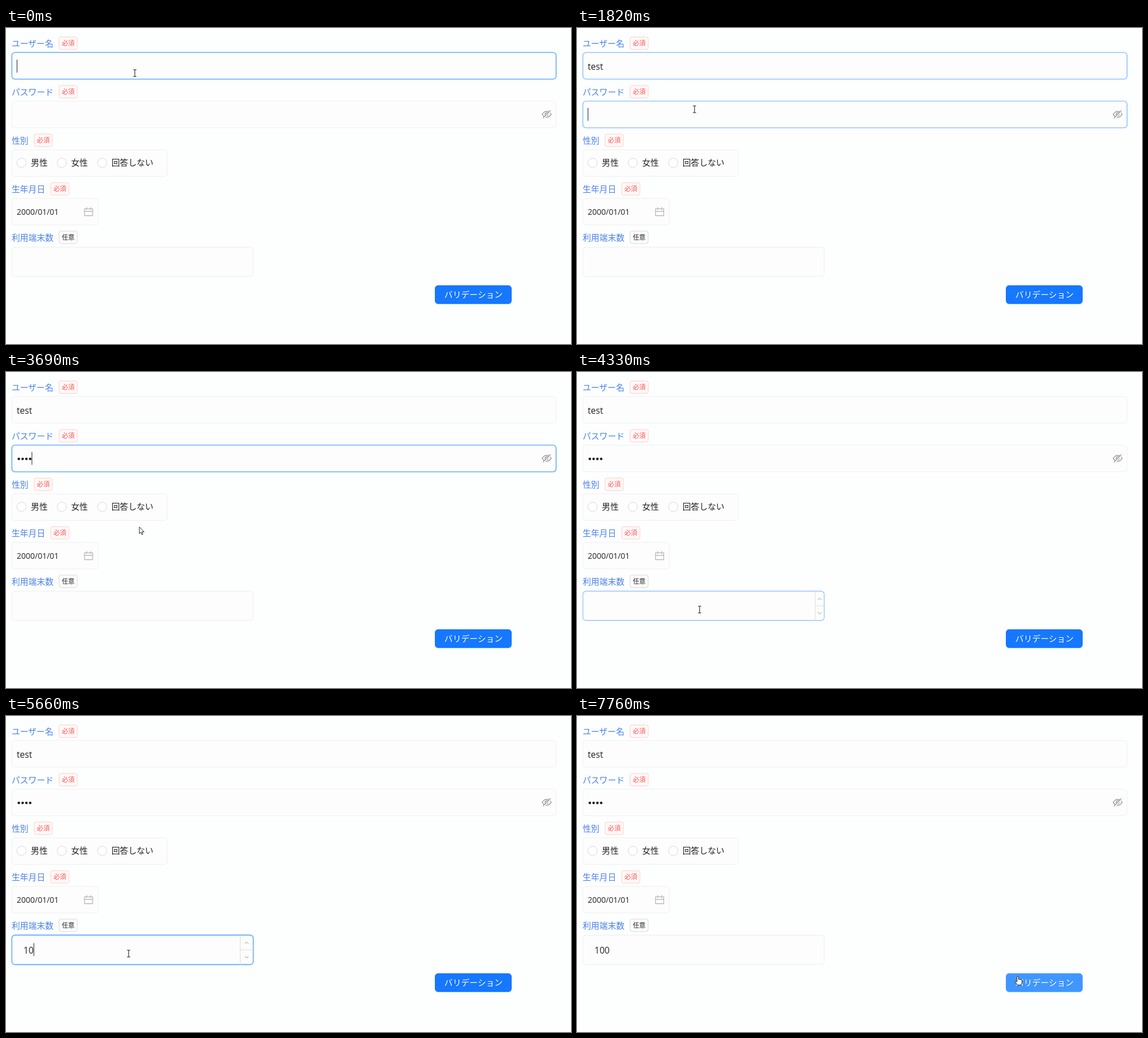
Recreate the animation shown at these times as an HTML page. Size 1000x560 px, loop 8000 ms.

```html
<!DOCTYPE html>
<html lang="ja">
<head>
<meta charset="utf-8">
<style>
  html, body { margin: 0; width: 100%; height: 100%; overflow: hidden; background: #fdfefe; }
  svg { display: block; width: 100vw; height: 100vh; }
  text { font: 300 14.8px "Noto Sans CJK JP", "Noto Sans CJK", sans-serif; fill: #222; }
  .latin { font: 400 15.6px "Open Sans", "Noto Sans", sans-serif; }
  .label { fill: #4a80e8; }
  .tag { font-size: 11.3px; font-weight: 400; }
  .line { fill: none; stroke-linecap: round; stroke-linejoin: round; }
</style>
</head>
<body>
<svg id="stage" viewBox="0 0 1000 560"></svg>
<script>
const stage = document.getElementById('stage');
const IDLE = 0, HOVER = 1, HALF = 2, FOCUS = 3;
const BORDER = ['#f0f0f2', '#86bafc', '#75b3ff', '#4096ff'];
const GLOW = [0, 0, 0.05, 0.1];

// Each track is a list of [start time in ms, value].
const tracks = {
  userState: [[0, FOCUS], [1820, HALF], [1950, IDLE]],
  userLength: [[0, 0], [300, 1], [450, 2], [720, 3], [870, 4]],
  userCaret: [[0, 1], [150, 0], [300, 1], [1700, 0]],
  passState: [[0, IDLE], [1400, HOVER], [1820, HALF], [1950, FOCUS], [3800, HALF], [3940, IDLE]],
  passLength: [[0, 0], [2520, 1], [2670, 2], [2950, 3], [3260, 4]],
  passCaret: [[0, 0], [1820, 1], [2370, 0], [2520, 1], [3800, 0]],
  countState: [[0, IDLE], [4330, HOVER], [4630, HALF], [4780, FOCUS], [7340, HALF], [7480, IDLE]],
  countLength: [[0, 0], [5360, 1], [5660, 2], [5810, 3]],
  countCaret: [[0, 0], [4630, 1], [5210, 0], [5360, 1], [6250, 0], [6650, 1], [7070, 0]],
  handleWidth: [[0, 0], [4330, 17], [4480, 24], [7070, 0]],
  buttonColor: [[0, '#1677ff'], [7760, '#4096ff']],
  pointer: [
    [0, ['beam', 228, 80]], [1100, ['arrow', 222, 96]], [1250, ['arrow', 212, 122]],
    [1400, ['arrow', 207.5, 137.5]], [1550, ['beam', 208, 144]],
    [3410, ['beam', 211, 165]], [3530, ['arrow', 224, 210]], [3660, ['arrow', 236, 275]],
    [3800, ['arrow', 240, 320]], [4070, ['arrow', 222, 366]], [4210, ['arrow', 218, 393]],
    [4330, ['beam', 217, 421]], [6790, ['beam', 260, 422]], [6930, ['beam', 400, 424]],
    [7070, ['arrow', 513, 426.5]], [7200, ['arrow', 610, 429]], [7340, ['arrow', 662, 432]],
    [7480, ['arrow', 725, 449]], [7610, ['arrow', 770.5, 462]], [7760, ['hand', 780, 461]]
  ]
};
const valueAt = (track, t) => track.findLast(([start]) => start <= t)[1];

const text = (x, y, str, attrs = '') => `<text x="${x}" y="${y}" ${attrs}>${str}</text>`;
const box = (x, y, w, h, attrs) => `<rect x="${x}" y="${y}" width="${w}" height="${h}" ${attrs}/>`;
const path = (d, attrs) => `<path class="line" d="${d}" ${attrs}/>`;

function label(y, name, required = true) {
  const x = 20.5 + name.length * 14.7;
  const [word, ink, edge, fill] = required
    ? ['必須', '#ff4d4f', '#ffccc7', '#fffaf9']
    : ['任意', '#222', '#d9d9d9', '#fcfcfc'];
  return text(10, y + 5.6, name, 'class="label"') +
    box(x, y - 11, 32, 22, `rx="3.5" fill="${fill}" stroke="${edge}"`) +
    text(x + 16, y + 4.2, word, `class="tag" text-anchor="middle" style="fill:${ink}"`);
}

function field(x, y, w, h, state = IDLE) {
  return box(x - 1, y - 1, w + 2, h + 2,
      `rx="6.5" fill="none" stroke="#0591ff" stroke-width="3" opacity="${GLOW[state]}"`) +
    box(x, y, w, h, `rx="5.5" fill="#fdfdfe" stroke="${BORDER[state]}" stroke-width="1.1"`);
}

const radio = (x, name) =>
  `<circle cx="${x}" cy="239" r="8.2" fill="#fff" stroke="#d9d9d9"/>` +
  text(x + 16.6, 244.2, name);

const caret = (x, y, visible) => visible ? box(x - 0.5, y - 11.5, 1, 23, 'fill="#222"') : '';

function eyeIcon() {
  return `<g transform="translate(957 153)">` +
    path('M-8 0Q-4.5-5.3 0-5.3T8 0Q4.5 5.3 0 5.3T-8 0Z', 'stroke="#8c8c8c" stroke-width="1.3"') +
    '<circle r="2.8" fill="none" stroke="#8c8c8c" stroke-width="1.3"/>' +
    path('M-5.5 7.2L7-5.8', 'stroke="#fdfdfe" stroke-width="2.5"') +
    path('M-6.4 6.6L6.4-6.6', 'stroke="#8c8c8c" stroke-width="1.3"') + '</g>';
}

const calendarIcon = () =>
  path('M139 320.3H153.5V332.5H139ZM139 325H153.5M142.7 318V322M149.7 318V322',
    'stroke="#b9b9b9" stroke-width="1.3"');

function stepper(width) {
  if (!width) return '';
  const left = 438 - width, mid = left + width / 2;
  return path(`M${left + 0.5} 389V440.5M${left + 0.5} 414.5H437`, 'stroke="#dedede"') +
    path(`M${mid - 3} 403.5l3-3 3 3M${mid - 3} 426l3 3 3-3`, 'stroke="#999"');
}

function pointer([kind, x, y]) {
  const shapes = {
    beam: path('M-2.5-6H-.7L0-5.4.7-6H2.5M0-5.4V5.4M-2.5 6H-.7L0 5.4.7 6H2.5',
      'stroke="#222" stroke-width="1.1"'),
    arrow: path('M0 0V11.5L2.7 9 4.5 13.2 6.3 12.4 4.5 8.3H8Z',
      'style="fill:#fff" stroke="#222"'),
    hand: path('M-1.3 1Q0-.7 1.3 1V6Q2.8 4.6 3.8 6.2 5.2 5 6 6.6 7.4 6 7.5 8V11.5L5.8 15.7H-.7L-4.5 10Q-4.4 8-2.8 8.8L-1.3 10.2Z',
      'style="fill:#fff" stroke="#222"')
  };
  return `<g transform="translate(${x} ${y})">${shapes[kind]}</g>`;
}

function render(t) {
  const now = {};
  for (const name in tracks) now[name] = valueAt(tracks[name], t);
  const dots = Array.from({ length: now.passLength }, (_, i) =>
    `<circle cx="${22.7 + i * 6.7}" cy="154" r="2.3" fill="#222"/>`).join('');

  stage.innerHTML = [
    label(27, 'ユーザー名'),
    field(10.5, 43.5, 963, 47, now.userState),
    text(19, 73.6, 'test'.slice(0, now.userLength), 'class="latin"'),
    caret([19.5, 25, 33.5, 40.5, 46.5][now.userLength], 67.5, now.userCaret),

    label(113, 'パスワード'),
    field(10.5, 129.7, 963, 47, now.passState),
    dots,
    caret(19.5 + now.passLength * 6.6, 153, now.passCaret),
    eyeIcon(),

    label(199, '性別'),
    field(10.5, 216, 275, 47),
    radio(27.5, '男性'), radio(98.7, '女性'), radio(170.2, '回答しない'),

    label(285, '生年月日'),
    field(10.5, 302, 153, 47),
    text(19, 331, '2000/01/01', 'class="latin" style="font-size:14px"'),
    calendarIcon(),

    label(371, '利用端末数', false),
    field(10.5, 388.4, 427, 52, now.countState),
    stepper(now.handleWidth),
    text(31, 420.6, '100'.slice(0, now.countLength), 'class="latin"'),
    caret(31.5 + now.countLength * 8.9, 414, now.countCaret),

    box(759, 458, 136, 33, 'rx="6" fill="#0591ff" opacity=".1"'),
    box(759, 456, 136, 33, `rx="6" fill="${now.buttonColor}"`),
    text(827.5, 478.2, 'バリデーション', 'text-anchor="middle" style="fill:#fff"'),
    pointer(now.pointer)
  ].join('');
}

let shown = -1;
function tick() {
  const t = performance.now() % 8000;
  const step = Math.floor(t / 10);
  if (step !== shown) render(t);
  shown = step;
  requestAnimationFrame(tick);
}
render(0);
tick();
</script>
</body>
</html>
```
